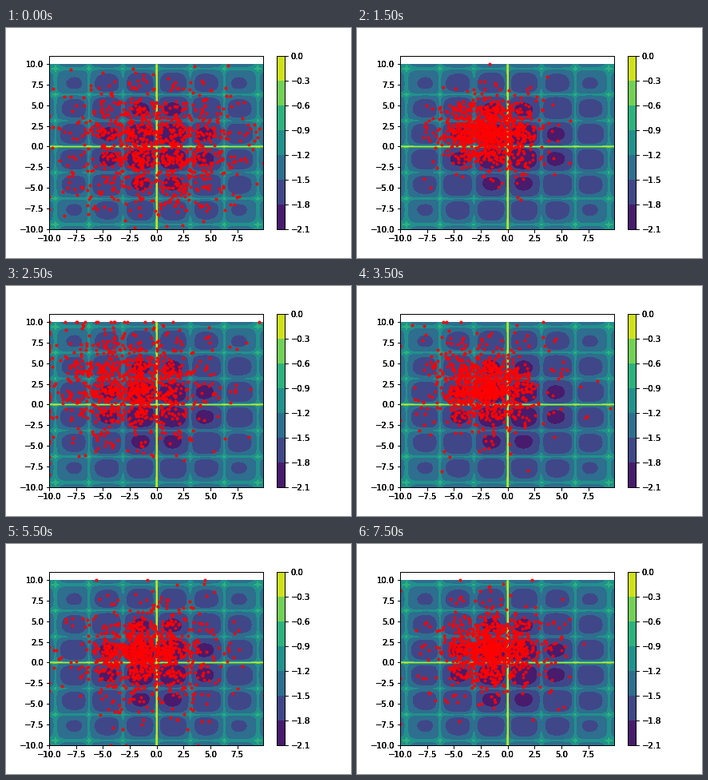
A matplotlib script that plays this animation: 432x288 px, repeating every 8000 ms.

```python
import numpy as np
import matplotlib.pyplot as plt
from matplotlib.animation import FuncAnimation

plt.rcParams["text.kerning_factor"] = 6  # whole-pixel letter spacing

W, H, DPI = 432, 288, 72
STEPS = 16
COUNT = 1000
BOUND = 10
LEVELS = np.round(np.arange(-2.1, 0.01, 0.3), 1)
XTICKS = np.arange(-10, 8, 2.5)
YTICKS = np.arange(-10, 11, 2.5)

rng = np.random.default_rng(7)
# Bounded bell-shaped offsets with unit deviation
cos_part, sin_part = rng.uniform(-1, 1, (2, 3, 2, COUNT)).sum(axis=1)
speed = rng.uniform(0.4, 1.6, (2, COUNT))
tail = rng.uniform(-1, 1, (3, COUNT)).sum(axis=0)


def cross_in_tray(x, y):
    r = np.hypot(x, y)
    wave = np.abs(np.sin(x) * np.sin(y) * np.exp(np.abs(100 - r / np.pi)))
    return -0.0001 * (wave + 1) ** 0.1


def swarm(step):
    """Particles orbit a drifting centre while the swarm breathes and settles."""
    shift = np.interp(step, [0, 4, 7, 11, 15], [0, 2.4, 2.0, 1.0, 1.5])
    breath = 0.9 * np.exp(-step / 14) * np.cos(2 * np.pi * step / 5.3)
    spread = 2.9 - step / 15 + breath
    weight = 0.35 * (1 - np.exp(-step / 3))
    orbit = cos_part * np.cos(speed * step) + sin_part * np.sin(speed * step)
    pos = np.array([[-shift], [shift]]) + spread * np.exp(weight * tail) * orbit
    pos += 0.12 * np.sin(2 * pos)  # drift towards the basins
    return np.clip(pos, -BOUND, BOUND)


def style_main(ax):
    ax.set(xlim=(-10, 9.9), ylim=(-10, 11), xticks=XTICKS, yticks=YTICKS)


def style_bar(ax):
    ax.set(ylim=(LEVELS[0], LEVELS[-1]), xticks=[], yticks=LEVELS)
    ax.yaxis.tick_right()


def harden(rect, style, times=3):
    """Redraw frame and labels on top for crisp, dark edges."""
    for _ in range(times):
        ax = fig.add_axes(rect)
        ax.patch.set_visible(False)
        style(ax)


fig = plt.figure(figsize=(W / DPI, H / DPI), dpi=DPI, facecolor="white")
main_rect = [0.125, 0.125, 0.62, 0.755]
bar_rect = [338.58 / W, 0.125, 10.87 / W, 0.755]
ax = fig.add_axes(main_rect)
bar = fig.add_axes(bar_rect)

axis = np.arange(-10, 10, 0.1)
gx, gy = np.meshgrid(axis, axis)
field = ax.contourf(gx, gy, cross_in_tray(gx, gy), levels=LEVELS, cmap="viridis")
fig.colorbar(field, cax=bar, ticks=LEVELS)

# The ridge along both axes is thinner than a pixel, so trace it
ridge = dict(color=plt.cm.viridis(13 / 14), lw=1, zorder=1.5,
             solid_capstyle="butt")
ax.plot([-10, 9.9], [0, 0], **ridge)
ax.plot([0, 0], [-10, 9.9], **ridge)
dots, = ax.plot([], [], "r.", markersize=6)

style_main(ax)
harden(main_rect, style_main)
harden(bar_rect, style_bar)


def update(step):
    dots.set_data(*swarm(step))
    return dots,


anim = FuncAnimation(fig, update, frames=STEPS, interval=500,
                     repeat=True, repeat_delay=0, blit=False)
plt.show()
```
